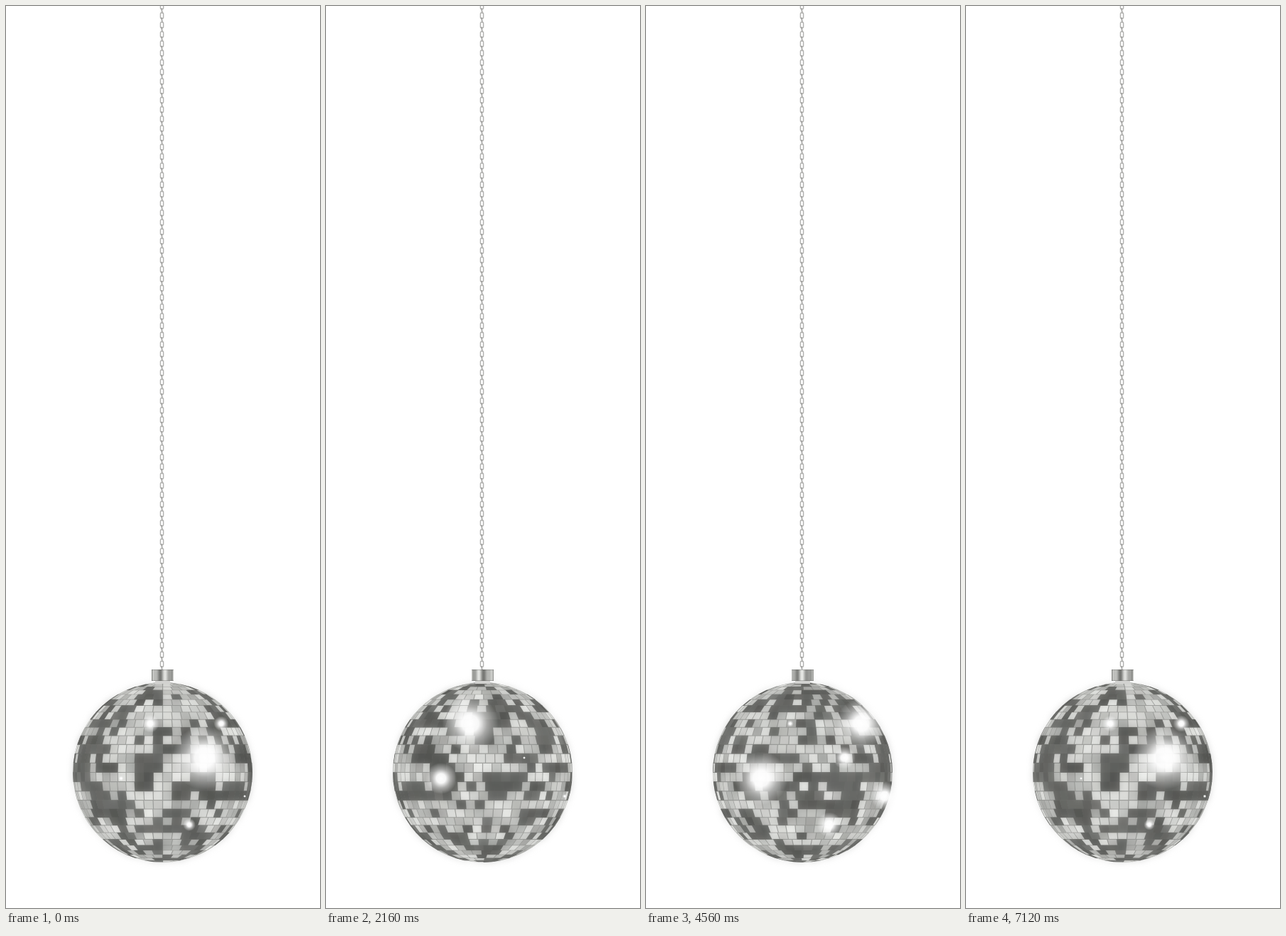
These frames come from a looping animation (442 by 1267 pixels, 7.2 s). An HTML page with a canvas:

```html
<!DOCTYPE html>
<html lang="en">
<head>
<meta charset="utf-8">
<title>Mirror ball</title>
<style>
html, body { margin: 0; width: 100%; height: 100%; overflow: hidden; background: #fff; }
canvas { display: block; }
</style>
</head>
<body>
<canvas id="stage" width="442" height="1267"></canvas>
<script>
const stage = document.getElementById('stage');
const ctx = stage.getContext('2d');
const skin = document.createElement('canvas');
skin.width = stage.width;
skin.height = stage.height;
const skinCtx = skin.getContext('2d');

const LOOP = 7200, STEP = 80, RAD = Math.PI / 180;
const CX = 220.5, CY = 1076.5, R = 126.5;
const ROWS = 30, CELL = 180 / ROWS;

// Each highlight swells and fades as the ball turns
const glints = [
  { x: 203, y: 1008, size: 40, rate: 1, peak: 100 },
  { x: 279, y: 1056, size: 45, rate: 2, peak: 0 },
  { x: 162, y: 1085, size: 44, rate: 2, peak: 68 },
  { x: 303, y: 1008, size: 38, rate: 1, peak: 255 },
  { x: 336, y: 1110, size: 20, rate: 1, peak: 230 },
  { x: 258, y: 1150, size: 18, rate: 2, peak: 40 }
];

const grey = v => `rgb(${v | 0},${v + 1 | 0},${v - 2 | 0})`;

function hash(a, b) {
  const v = Math.sin(a * 127.1 + b * 311.7) * 43758.5453;
  return v - Math.floor(v);
}

// Wide, tall and single-tile noise together give clumped patches
function makeTile(lon, row, width) {
  const col = Math.round(lon / CELL);
  const wide = hash(Math.floor((col + row % 3) / 3), row + 40);
  const tall = hash(col + 90, Math.floor((row + col % 2) / 2));
  const block = hash(Math.floor(col / 3) + 200, Math.floor(row / 2));
  const own = hash(col, row);
  const dark = wide + tall + block + own * 0.5 < 1.62;
  const tone = dark ? 90 + 20 * own : 172 + 62 * hash(col + 17, row + 5);
  return { lon, row, width, dark, tone };
}

// Near-square tiles: rows towards the poles hold fewer of them
const tiles = [];
for (let row = 0; row < ROWS; row++) {
  const count = Math.round(2 * ROWS * Math.sin((row + 0.5) * CELL * RAD));
  const width = 360 / count;
  for (let i = 0; i < count; i++) tiles.push(makeTile(i * width, row, width));
}

function project(lon, lat) {
  const a = Math.max(-90, Math.min(90, lon)) * RAD, b = lat * RAD;
  return [CX + R * Math.sin(b) * Math.sin(a), CY - R * Math.cos(b)];
}

function drawTile({ lon, row, width, dark, tone }, turn) {
  const left = ((lon - turn + 540 + width) % 360) - 180 - width;
  if (left > 90 || left < -90 - width) return;
  const gap = dark ? -0.1 : 0.28;
  const side = gap * width / CELL;
  const l = left + side, r = left + width - side;
  const t = row * CELL + gap, b = (row + 1) * CELL - gap;
  skinCtx.beginPath();
  for (const f of [0, 0.5, 1]) skinCtx.lineTo(...project(l + (r - l) * f, t));
  for (const f of [1, 0.5, 0]) skinCtx.lineTo(...project(l + (r - l) * f, b));
  skinCtx.fillStyle = grey(tone + 8 * Math.sin(turn * RAD * 3 + lon + row));
  skinCtx.fill();
}

function drawBall(turn) {
  skinCtx.clearRect(0, 0, skin.width, skin.height);
  skinCtx.fillStyle = grey(142);
  skinCtx.beginPath();
  skinCtx.arc(CX, CY, R - 0.3, 0, 7);
  skinCtx.fill();
  for (const tile of tiles) drawTile(tile, turn);

  ctx.filter = 'blur(0.5px)';
  ctx.drawImage(skin, 0, 0);
  // A blurred copy adds the soft bloom between tiles
  ctx.filter = 'blur(5px)';
  ctx.globalAlpha = 0.28;
  ctx.drawImage(skin, 0, 0);
  ctx.filter = 'none';
  ctx.globalAlpha = 1;
}

function glow(x, y, r) {
  const g = ctx.createRadialGradient(x, y, 0, x, y, r);
  g.addColorStop(0, '#fff');
  g.addColorStop(0.3, 'rgba(255,255,255,.95)');
  g.addColorStop(0.6, 'rgba(255,255,255,.45)');
  g.addColorStop(1, 'rgba(255,255,255,0)');
  ctx.fillStyle = g;
  ctx.beginPath();
  ctx.arc(x, y, r, 0, 7);
  ctx.fill();
}

function drawGlints(turn) {
  for (const { x, y, size, rate, peak } of glints) {
    const swell = (1 + Math.cos((turn - peak) * rate * RAD)) / 2;
    const r = size * swell ** 1.3;
    if (r > 2) glow(x, y, r);
  }
}

function drawChain() {
  ctx.lineWidth = 1.4;
  for (let y = -4; y < 932; y += 13.2) {
    ctx.strokeStyle = '#b0b0ae';
    ctx.beginPath();
    ctx.roundRect(217.4, y, 4.2, 8.6, 2);
    ctx.stroke();
    ctx.strokeStyle = '#989896';
    ctx.beginPath();
    ctx.moveTo(219, y + 7);
    ctx.lineTo(220, y + 14.5);
    ctx.stroke();
  }
}

function drawCap(turn) {
  const g = ctx.createLinearGradient(205, 0, 236, 0);
  for (let i = 0; i <= 16; i++) {
    const a = Math.asin(i / 8 - 1);
    const shine = Math.sin(a * 5 + turn * RAD * 2) + 0.6 * Math.sin(a * 9 - turn * RAD);
    g.addColorStop(i / 16, grey(172 + 40 * shine));
  }
  ctx.fillStyle = '#d2d2d0';
  ctx.fillRect(210, 947, 21, 5);
  ctx.fillStyle = g;
  ctx.fillRect(205, 932, 31, 16);
  ctx.fillStyle = 'rgba(90,90,88,.35)';
  ctx.fillRect(205, 932, 31, 1);
  ctx.fillRect(205, 947, 31, 1);
}

function frame(now) {
  const turn = Math.floor((now % LOOP) / STEP) * STEP / LOOP * 360;
  ctx.fillStyle = '#fff';
  ctx.fillRect(0, 0, stage.width, stage.height);
  drawChain();
  drawBall(turn);
  drawGlints(turn);
  drawCap(turn);
  requestAnimationFrame(frame);
}
requestAnimationFrame(frame);
</script>
</body>
</html>
```
